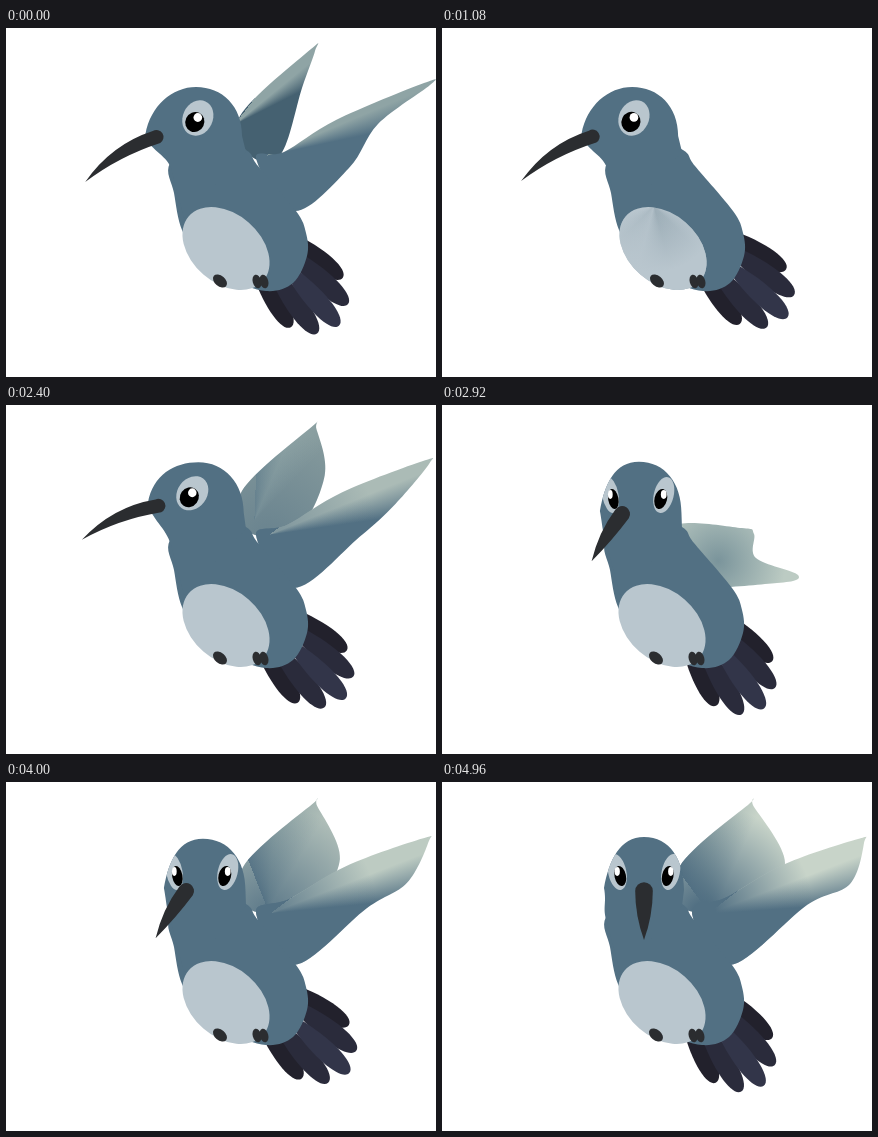
An HTML page with a canvas for the animation above (5000 ms loop, 430 by 349 pixels).

```html
<!DOCTYPE html>
<html>
<head>
<meta charset="utf-8">
<style>
  html, body { margin: 0; width: 100%; height: 100%; overflow: hidden; background: #fff; }
  canvas { display: block; }
</style>
</head>
<body>
<canvas id="stage" width="430" height="349"></canvas>
<script>
const ctx = document.getElementById('stage').getContext('2d');
const STEP = 40, STEPS = 125, RAD = Math.PI / 180;
const BODY = [82, 112, 131], PALE = [200, 212, 201], LIGHT = [143, 164, 165], DARK = [69, 97, 113];
const BELLY = [185, 198, 206], INK = '#2b2d30';

const sin = deg => Math.sin(deg * RAD);
const cos = deg => Math.cos(deg * RAD);
const rgb = (c, a = 1) => `rgba(${c.join()},${a})`;
const mix = (a, b, k) => Array.isArray(a) ? a.map((v, i) => mix(v, b[i], k)) : a + (b - a) * k;

function keyed(keys, t) {
  let i = 1;
  while (i < keys.length - 1 && keys[i][0] < t) i++;
  const [t0, ...a] = keys[i - 1], [t1, ...b] = keys[i];
  const k = (t - t0) / (t1 - t0);
  return mix(a, b, k * k * (3 - 2 * k));
}

// Closed smooth curve through points.
function blob(pts) {
  const n = pts.length, at = i => pts[(i + n) % n];
  const path = new Path2D();
  path.moveTo(...pts[0]);
  for (let i = 0; i < n; i++) {
    const [p, a, b, q] = [at(i - 1), at(i), at(i + 1), at(i + 2)];
    path.bezierCurveTo(a[0] + (b[0] - p[0]) / 6, a[1] + (b[1] - p[1]) / 6,
      b[0] - (q[0] - a[0]) / 6, b[1] - (q[1] - a[1]) / 6, ...b);
  }
  return path;
}

function fill(path, style) {
  ctx.fillStyle = style;
  ctx.fill(path);
}

function oval(x, y, rx, ry, deg, style) {
  const path = new Path2D();
  path.ellipse(x, y, rx, ry, deg * RAD, 0, 2 * Math.PI);
  fill(path, style);
}

function fan([x, y], [from, to], colors) {
  const g = ctx.createConicGradient(from * RAD, x, y);
  colors.forEach((c, i) => g.addColorStop(i / (colors.length - 1) * (to - from) / 360, c));
  return g;
}

function glow(x, y, r0, r1, inner, outer) {
  const g = ctx.createRadialGradient(x, y, r0, x, y, r1);
  g.addColorStop(0, inner);
  g.addColorStop(1, outer);
  return g;
}

// Each raised wing goes from narrow to open: outline, fan centre, fan angles, fan colours.
const farWing = [
  [[[234, 88], [305, 21], [309, 23], [296, 60], [275, 126], [245, 128]],
    [228, 97], [-52, -14], [LIGHT, LIGHT, DARK, DARK]],
  [[[238, 84], [306, 23], [312, 25], [343, 81], [310, 122], [245, 128]],
    [270, 135], [-126, -36], [BODY, LIGHT, PALE, PALE]]
];
const nearWing = [
  [[[250, 130], [278, 124], [330, 92], [418, 55], [424, 57], [372, 96], [343, 140], [288, 183]],
    [260, 128], [-34, -12], [LIGHT, LIGHT, BODY]],
  [[[250, 130], [285, 115], [343, 82], [416, 57], [422, 61], [408, 102], [365, 123], [288, 183]],
    [266, 132], [-38, -4], [PALE, PALE, BODY]]
];
const backWing = blob([[230, 122], [300, 123], [312, 129], [314, 153], [356, 170], [335, 178], [240, 178]]);

function raisedWing([narrow, wide], open) {
  const [pts, centre, span, colors] = mix(narrow, wide, open);
  const path = blob(pts);
  fill(path, fan(centre, span, colors.map(c => rgb(c))));
  fill(path, glow(262, 132, 12, 110, rgb(BODY, open), rgb(BODY, 0)));
}

function wings(beat, open) {
  if (beat === 0) {
    raisedWing(farWing, open);
    raisedWing(nearWing, open);
  } else if (beat < 3) {
    ctx.save();
    if (beat === 2) {
      ctx.translate(250, 135);
      ctx.rotate(35 * RAD);
      ctx.scale(0.8, 0.8);
      ctx.translate(-250, -135);
    }
    fill(backWing, glow(276, 156, 0, 68, '#7a949b', rgb([188, 203, 195])));
    ctx.restore();
  }
}

const feather = new Path2D('M-90 0 L-70 -6 C-30 -14 0 -10 0 0 C0 10 -30 14 -70 6 Z');

function tail(f) {
  ctx.save();
  ctx.translate(262, 178);
  ctx.rotate((6 * Math.sin(2 * Math.PI * (f / 10.15 + 0.02)) - 0.5) * RAD);
  for (const i of [0, 4, 1, 3, 2]) {
    const middle = sin(45 * i), angle = 27 + 9.6 * i, reach = 109 + 26 * middle;
    ctx.save();
    ctx.translate(reach * cos(angle) - 22, reach * sin(angle) + 22);
    ctx.rotate((36 + 6 * i) * RAD);
    fill(feather, rgb(mix([34, 33, 44], [50, 53, 73], middle ** 2)));
    ctx.restore();
  }
  ctx.restore();
}

const torso = blob([[164, 135], [168, 165], [176, 202], [195, 229], [222, 250], [260, 263], [287, 255],
  [301, 228], [300, 205], [290, 183], [252, 138], [240, 122], [200, 105]]);

function body(beat) {
  const belly = style => oval(220, 220.5, 49.3, 34.5, 41, style);
  ctx.save();
  if (beat === 3) ctx.translate(1, 0);
  fill(torso, rgb(BODY));
  belly(rgb(BELLY));
  if (beat === 3) {
    const shade = [0, 0.3, 0.35, 0.08, 0.16, 0].map(a => rgb([104, 128, 140], a));
    belly(fan([211, 178], [15, 165], shade));
    belly(glow(211, 178, 8, 66, rgb(BELLY, 0), rgb(BELLY)));
  }
  oval(214, 253, 8, 5.3, 40, INK);
  for (const x of [251, 258]) oval(x, 253.5, 4.3, 7, -15, INK);
  ctx.restore();
}

// Time, turn away from the viewer in degrees, lift of the beak.
const HEAD_CYCLE = 26.5;
const headKeys = [[0, 82, 0], [5, 82, 1], [9.5, 108, 0], [18, 0, 0], [20, 25, 0], [21, 25, 0],
  [HEAD_CYCLE, 82, 0]];

function skullPath(x, turn, lift) {
  const left = 162 - 23 * sin(Math.min(turn, 90)) ** 2 + 5 * lift;
  const right = 242 - 6 * sin(turn) + 3 * lift;
  const top = 55 + 4 * sin(turn) - 3 * lift;
  const snout = 106 - 14 * lift;
  const path = new Path2D();
  path.moveTo(right, 108);
  path.bezierCurveTo(right, 78, x + 26, top, x, top);
  path.bezierCurveTo(x - 24, top, left + 5, snout - 28, left, snout);
  path.bezierCurveTo(left + 3, snout + 16, 160, 126 - 6 * lift, 165, 140);
  path.lineTo(178, 190);
  path.lineTo(240, 124);
  return path;
}

function beak(x, turn, lift) {
  const side = sin(turn);
  const bx = x - 40 * side, by = 109 - 14 * lift;
  const tx = x - (112 + 8 * lift) * side, ty = 158 - 4 * side - 33 * lift;
  const r = 8.8 - 1.8 * side, bend = 11 * side ** 2;
  const length = Math.hypot(tx - bx, ty - by);
  ctx.save();
  ctx.translate(bx, by);
  ctx.rotate(Math.atan2(ty - by, tx - bx));
  const path = new Path2D();
  path.moveTo(length, 0);
  path.quadraticCurveTo(length / 2, bend + r, 0, r);
  path.arc(0, 0, r, Math.PI / 2, -Math.PI / 2);
  path.quadraticCurveTo(length / 2, bend - r, length, 0);
  fill(path, INK);
  ctx.restore();
}

// Eyes sit 42 degrees to either side of a sphere.
function eye(headX, turn, lift, side) {
  const around = 42 * side - turn * turn / 170;
  const x = headX + 40 * sin(around), y = 90 - 3 * lift;
  const width = 15 * Math.max(0, cos(around)) ** 1.7;
  const tilt = 12 * side + 13 * sin(turn * turn / 85) + 20 * lift;
  if (width < 0.6) return;
  oval(x, y, width, 18.3, tilt, rgb(BELLY));
  oval(x - 3 * side, y + 4, 0.63 * width, 10.2, tilt, '#000');
  oval(x, y - 0.5, 0.29 * width, 4.4, 0, '#fff');
}

function head(f) {
  const [turn, lift] = keyed(headKeys, f % HEAD_CYCLE);
  const x = 202 - 12 * sin(turn) + 4 * lift;
  const skull = skullPath(x, turn, lift);
  const behind = turn > 95;
  if (behind) beak(x, turn, lift);
  fill(skull, rgb(BODY));
  ctx.save();
  ctx.clip(skull);
  for (const side of [-1, 1]) eye(x, turn, lift, side);
  ctx.restore();
  if (!behind) beak(x, turn, lift);
}

function draw(f) {
  const beat = f % 4;
  ctx.fillStyle = '#fff';
  ctx.fillRect(0, 0, 430, 349);
  tail(f);
  wings(beat, f / (STEPS - 1));
  body(beat);
  head(f);
}

const start = performance.now();
function tick() {
  draw(Math.floor((performance.now() - start) / STEP) % STEPS);
  requestAnimationFrame(tick);
}
tick();
</script>
</body>
</html>
```
